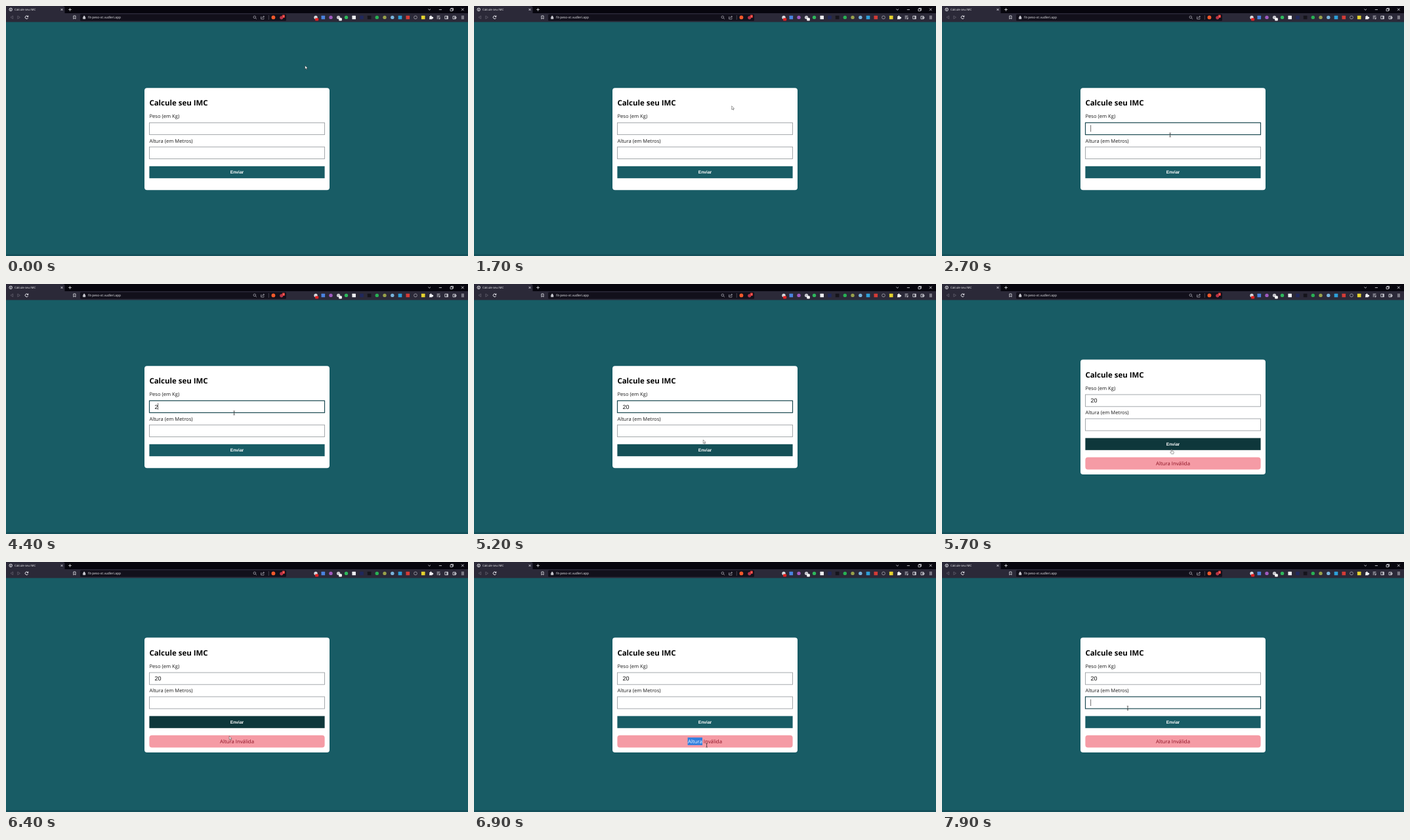
Recreate the animation shown at these times as an HTML page. Size 704 px wide and 382 px high, loop 8000 ms.

```html
<!DOCTYPE html>
<html lang="pt">
<head>
<meta charset="utf-8">
<title>Calcule seu IMC</title>
<style>
  html, body { margin: 0; width: 100%; height: 100%; overflow: hidden; background: #185c65; }
  svg { display: block; width: 100%; height: 100%; }
  text { font-family: "Open Sans", sans-serif; text-rendering: geometricPrecision; white-space: pre; }
  .ui { font-family: "Liberation Sans", Arial, sans-serif; }
  .line { fill: none; stroke: #e4e4ea; stroke-width: .8; }
  .dim { stroke: #62606e; }
  .label { font-size: 7.63px; fill: #1c1c1c; }
  .field { fill: #fff; stroke: #9a9fa3; stroke-width: .9; }
  .field.on { stroke: #1c4a52; stroke-width: 1.2; }
</style>
</head>
<body>
<svg viewBox="0 0 704 382">
  <rect width="704" height="382" fill="#185c65"/>
  <rect y="379" width="704" height="3" fill="#14505a"/>

  <!-- browser window -->
  <rect width="704" height="12" fill="#07060e"/>
  <path d="M0 0H86.5Q89.5 0 89.5 3V11H704V24.5H0Z" fill="#2b2938"/>
  <g class="line">
    <circle cx="7.2" cy="5.4" r="2.3"/>
    <path d="M5.4 4.4L7.4 5.2L7 7.4M8 3.4L9 4.8"/>
    <path d="M83.5 4L86.5 7M86.5 4L83.5 7M97.5 3.2V7.8M95.2 5.5H99.8"/>
    <path d="M643.4 4.6L645.2 6.3L647 4.6M659.8 5.6H664"/>
    <path d="M677 4.4H680.4V7.6H677ZM678 4.2V3.4H681.5V6.8H680.6M694 3.6L697.6 7.2M697.6 3.6L694 7.2"/>
    <path class="dim" d="M10.6 15L7 17.3L10.6 19.6ZM17.8 15L21.4 17.3L17.8 19.6Z"/>
    <path d="M33.4 16A2.3 2.3 0 1 0 33.6 18.2M33.8 14.6V16.5H31.8" stroke-width="1"/>
    <path d="M102.8 15H106V19.8L104.4 18.5L102.8 19.8Z"/>
  </g>
  <text x="13" y="7.1" font-size="4.4" fill="#f2f2f4">Calcule seu IMC</text>
  <rect x="113" y="12.6" width="314" height="10.2" rx="1.5" fill="#12101b"/>
  <path d="M117.3 17H121V19.8H117.3ZM118 17V16.2A1.15 1.15 0 0 1 120.3 16.2V17" fill="#c8c8ce" stroke="#c8c8ce" stroke-width=".4"/>
  <text x="125" y="19.4" font-size="4.9" fill="#f0f0f3">fit-peso-xt.vudleri.app</text>
  <g class="line" style="stroke:#a4a3ad">
    <circle cx="378.8" cy="17" r="1.8"/>
    <path d="M380.2 18.4L382 20.2M389.4 16.5H388.6V20H393V18.6M390 18.5Q390.3 16.4 393.4 16.3M392 14.9L393.6 16.3L392 17.7"/>
    <path d="M400.3 14V21" stroke="#55535f"/>
  </g>
  <circle cx="407.4" cy="17.4" r="2.9" fill="#f0592b"/>
  <circle cx="419.8" cy="17.8" r="2.6" fill="#b5344a"/>
  <rect x="420.8" y="13.5" width="4.2" height="4.6" rx="1" fill="#d9302c"/>
  <text x="422.9" y="17.2" font-size="3.6" fill="#fff" text-anchor="middle">2</text>
  <g id="addons"></g>
  <rect x="471" y="18.4" width="5.2" height="4" rx=".8" fill="#e02020"/>
  <rect x="507.2" y="18.2" width="4.6" height="4.4" rx=".8" fill="#fff"/>
  <path d="M645 16H646.4A1.1 1.1 0 1 1 648.4 16H649.6V17A1.1 1.1 0 1 1 649.6 19V20.2H645V18.8A1 1 0 0 0 645 17Z" fill="#f0f0f3"/>
  <g class="line">
    <path d="M656.6 15.4H661.4M656.6 17.3H659.6M656.6 19.2H658.6M661 17V19.4"/>
    <circle cx="660.4" cy="19.4" r=".6"/>
    <path d="M668.8 15.3H673.4V19.7H668.8ZM671.9 15.3V19.7M672.7 15.3V19.7"/>
    <path d="M681 15.6H685.2V19.8H681ZM683.4 17H686V18.6H683.4Z"/>
    <path d="M693.9 15.6H698M693.9 17.5H698M693.9 19.4H698"/>
  </g>

  <!-- page -->
  <rect id="card" x="211" width="282" rx="4" fill="#fff"/>
  <g id="form">
    <text x="218.4" y="152" font-size="11.44" font-weight="700" fill="#000">Calcule seu IMC</text>
    <text class="label" x="218.4" y="171.4">Peso (em Kg)</text>
    <rect id="weight" class="field" x="218.5" y="178.4" width="267" height="18.2"/>
    <text id="value" class="ui" x="226.4" y="190.5" font-size="9" fill="#111"></text>
    <text class="label" x="218.4" y="208.5">Altura (em Metros)</text>
    <rect id="height" class="field" x="218.5" y="215.3" width="267" height="18.2"/>
    <rect id="caret" width=".7" height="10.2" fill="#333"/>
    <rect id="button" x="218.4" y="244.8" width="267.2" height="18.4"/>
    <text class="ui" x="352" y="256.2" font-size="6.7" font-weight="700" fill="#fff" text-anchor="middle">Enviar</text>
  </g>
  <g id="alert">
    <rect x="218.4" y="264.8" width="267.2" height="18.6" rx="4" fill="#f59ba5"/>
    <rect id="mark" x="325.6" y="268.2" width="22.4" height="11.6" fill="#2f7fe0"/>
    <text x="352" y="277" font-size="7.78" fill="#8a1020" text-anchor="middle"><tspan id="word">Altura</tspan> Inválida</text>
  </g>

  <g id="pointer">
    <path id="arrow" d="M0 0V5.4L1.3 4.3L2.2 6.2L3.1 5.8L2.2 3.9H3.9Z" fill="#fff" stroke="#111" stroke-width=".4"/>
    <path id="beam" d="M-1.2 -3H-.3L0 -2.7L.3 -3H1.2M0 -2.7V2.7M-1.2 3H-.3L0 2.7L.3 3H1.2" fill="none" stroke="#222" stroke-width=".7"/>
    <path id="hand" d="M-.6 .4Q0 -.4 .6 .4V2.6L3 3.2Q3.6 3.4 3.5 4.2L3 7H-.2L-2 4.6Q-1.6 3.8 -.6 4.6Z" fill="#fff" stroke="#111" stroke-width=".4"/>
  </g>
</svg>
<script>
const LOOP = 8000, STEP = 100, LIFT = -9.4;
const $ = id => document.getElementById(id);
const set = (id, attrs) => {
  for (const k in attrs) $(id).setAttribute(k, attrs[k]);
};
const show = (id, on) => set(id, { visibility: on ? "visible" : "hidden" });
const clamp = v => Math.min(1, Math.max(0, v));
const within = (t, a, b) => t >= a && t < b;

// toolbar add-ons: x, colour, shape
const addons = [
  [472, "#d8d8dc", "dot"], [483.3, "#4a83e0", "box"], [495, "#a05ac0", "dot"],
  [506.6, "#c4c4ca", "dot"], [518.5, "#2eb85c", "dot"], [530.2, "#ededf0", "box"],
  [542, "#20285c", "box"], [553.6, "#15141c", "box"], [565.3, "#28b053", "dot"],
  [577, "#98a04a", "dot"], [588.8, "#79b4dc", "dot"], [600.5, "#2d9fd8", "box"],
  [612.3, "#d43b36", "box"], [624, "#8d8c96", "ring"], [635.7, "#e5d32e", "box"]
];
$("addons").innerHTML = addons.map(([x, c, kind]) =>
  kind === "box" ? `<rect x="${x - 2.8}" y="14.7" width="5.6" height="5.6" rx=".6" fill="${c}"/>`
  : kind === "dot" ? `<circle cx="${x}" cy="17.4" r="2.7" fill="${c}"/>`
  : `<circle cx="${x}" cy="17.4" r="2.4" fill="none" stroke="${c}"/>`).join("");

// pointer stops: time, x, y
const path = [
  [0, 455.7, 91], [1200, 455.7, 91], [2100, 347.6, 197], [4600, 347.6, 197],
  [5500, 349.8, 252.6], [6200, 349.8, 252.6], [6400, 340.2, 266],
  [6600, 341, 274], [6700, 341, 274], [6900, 354.6, 280], [7100, 354.6, 280],
  [7800, 283, 223.3], [LOOP, 283, 223.3]
];

function pointerAt(t) {
  const i = path.findIndex(p => p[0] > t);
  const [t0, x0, y0] = path[i - 1], [t1, x1, y1] = path[i];
  const u = (t - t0) / (t1 - t0), e = u * u * (3 - 2 * u);
  return [x0 + (x1 - x0) * e, y0 + (y1 - y0) * e];
}

function pointerKind(x, y, dy, alert) {
  const inside = (l, top, r, bottom) => x >= l && x <= r && y >= top + dy && y <= bottom + dy;
  if (inside(218, 244.8, 486, 263.2)) return "hand";
  if (inside(218, 178, 486, 197.2) || inside(218, 215, 486, 234)) return "beam";
  if (alert && x > 325 && x < 379 && y > 268 && y < 281) return "beam";
  return "arrow";
}

function mix(a, b, u) {
  return `rgb(${a.map((v, i) => Math.round(v + (b[i] - v) * u))})`;
}

function draw(t) {
  const alert = t >= 5700, dy = alert ? LIFT : 0;
  set("card", { y: alert ? 115.6 : 125.2, height: alert ? 175.4 : 156 });
  set("form", { transform: `translate(0 ${dy})` });
  show("alert", alert);

  const onWeight = within(t, 2200, 5500), onHeight = t >= 7800;
  $("weight").classList.toggle("on", onWeight);
  $("height").classList.toggle("on", onHeight);

  const value = t < 4400 ? "" : t < 4500 ? "2" : "20";
  $("value").textContent = value;
  show("caret", within(t, 2300, 2800) || within(t, 3300, 3800) || within(t, 4400, 5000) || onHeight);
  set("caret", { x: 226.4 + (onHeight ? 0 : value.length * 5), y: onHeight ? 219.2 : 182 });

  const hover = clamp((t - 5100) / 300) - clamp((t - 6400) / 300);
  set("button", { fill: mix([24, 92, 101], [14, 55, 59], hover) });

  const picked = within(t, 6700, 7800);
  show("mark", picked);
  if (!alert) show("mark", false);
  set("word", { fill: picked ? "#fff" : "#8a1020" });

  const [x, y] = pointerAt(t), kind = pointerKind(x, y, dy, alert);
  set("pointer", { transform: `translate(${x} ${y})` });
  for (const id of ["arrow", "beam", "hand"]) show(id, id === kind);
}

// the mark must not override its hidden parent
let start;
function tick(now) {
  start ??= now;
  draw(Math.floor((now - start) % LOOP / STEP) * STEP);
  requestAnimationFrame(tick);
}
draw(0);
requestAnimationFrame(tick);
</script>
</body>
</html>
```
